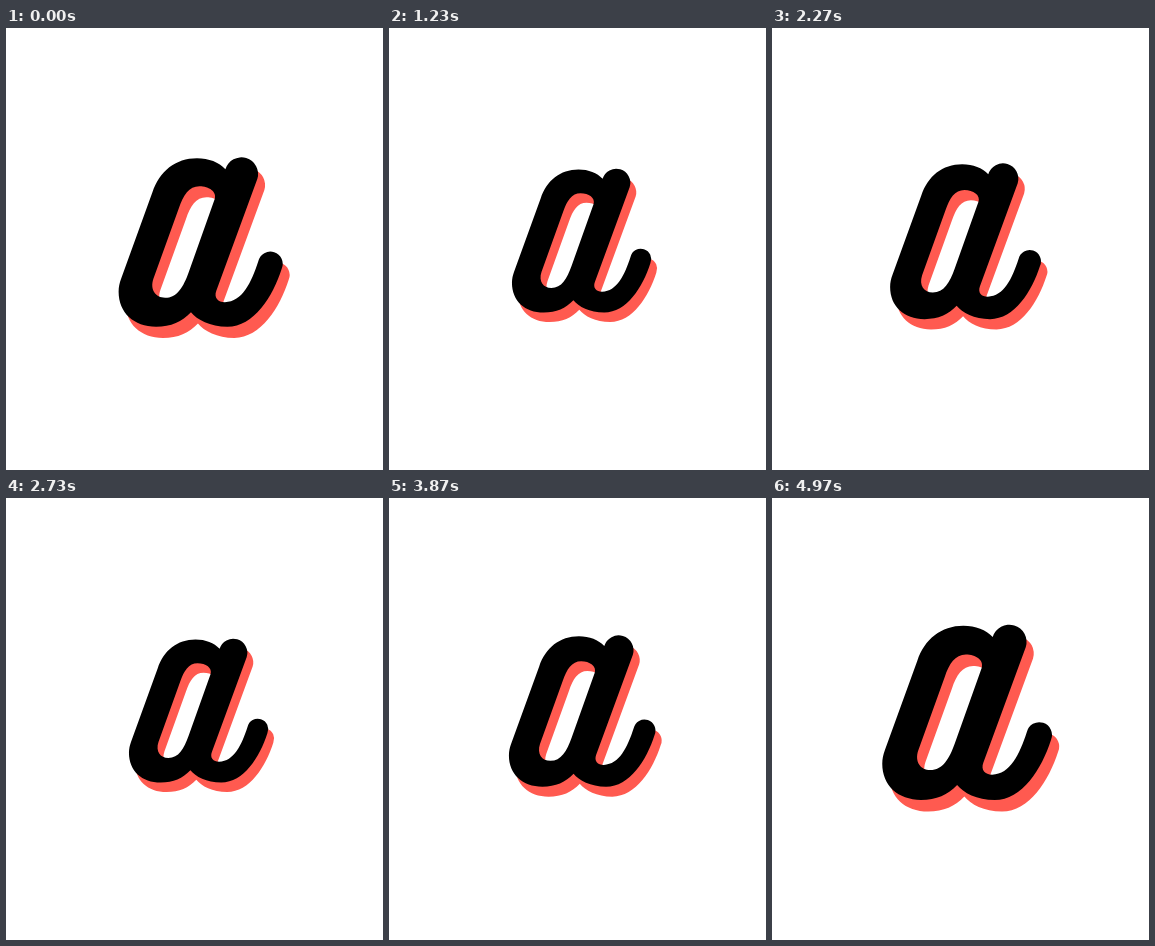
An HTML page with a canvas for the animation above (5010 ms loop, 377 by 442 pixels).

```html
<!DOCTYPE html>
<html lang="en">
<head>
<meta charset="utf-8">
<title>Pulsing letter</title>
<style>
  html, body { margin: 0; width: 100%; height: 100%; overflow: hidden; background: #fff; }
  canvas { display: block; width: 377px; height: 442px; }
</style>
</head>
<body>
<canvas id="stage"></canvas>
<script>
const W = 377, H = 442;
const LOOP = 5010, STEP = 100 / 3, STEPS = 150;
const BEAT = 1500, RISE = 500, PEAK = 250;
const SMALL = 0.846, LARGE = 1.148;
const PIVOT = { x: 181, y: 205 };
const SHADOW = { x: 7, y: 11.2 };

const canvas = document.getElementById('stage');
const ratio = window.devicePixelRatio || 1;
canvas.width = W * ratio;
canvas.height = H * ratio;
const ctx = canvas.getContext('2d');

const letter = new Path2D(
  // outer contour
  'M219.5 141 A16.7 16.7 0 1 1 251.6 150.7 L210.4 263' +
  'C207.8 270 212 274.5 219 274.5 C236.5 274 245.5 255 252.6 233.2' +
  'A12.35 12.35 0 1 1 276 240.8 C267 269 248 299 221.5 299' +
  'C204 299 191 292 185 284.5 C176 294 165 299 150 299' +
  'C127.5 299 112.4 285 112.4 264 C112.4 259 113.4 255 114.9 250.8' +
  'L146.4 164 C153.4 143 169.5 130 191 130 C203 130 213 134 219.5 141Z' +
  // counter
  'M147.3 251 L172.9 180 C177.3 167 183 158 193.5 158' +
  'C203 158 211.3 163.5 208.8 171 L182.8 244 C177.5 259 171 270 159 270' +
  'C149.5 270 143.6 262 147.3 251Z'
);

// Steady growth, then a decelerating shrink.
function scaleAt(t) {
  const p = (t - PEAK + BEAT) % BEAT;
  const fall = BEAT - RISE;
  const k = p < fall ? (1 - p / fall) ** 2 : (p - fall) / RISE;
  return SMALL + (LARGE - SMALL) * k;
}

function fillLetter(color, dx, dy) {
  ctx.save();
  ctx.translate(dx, dy);
  ctx.fillStyle = color;
  ctx.fill(letter, 'evenodd');
  ctx.restore();
}

function draw(t) {
  const s = scaleAt(t);
  ctx.setTransform(ratio, 0, 0, ratio, 0, 0);
  ctx.fillStyle = '#fff';
  ctx.fillRect(0, 0, W, H);
  ctx.translate(PIVOT.x, PIVOT.y);
  ctx.scale(s, s);
  ctx.translate(-PIVOT.x, -PIVOT.y);
  fillLetter('#ff5a50', SHADOW.x, SHADOW.y);
  fillLetter('#000', 0, 0);
}

// Thirty poses per second, switching on whole hundredths.
function heldTime(ms) {
  const tick = Math.floor((ms % LOOP) / 10) * 10;
  return Math.min(Math.floor((tick + 4) / STEP), STEPS - 1) * STEP;
}

const start = performance.now();
function tick() {
  draw(heldTime(performance.now() - start));
  requestAnimationFrame(tick);
}
tick();
</script>
</body>
</html>
```
